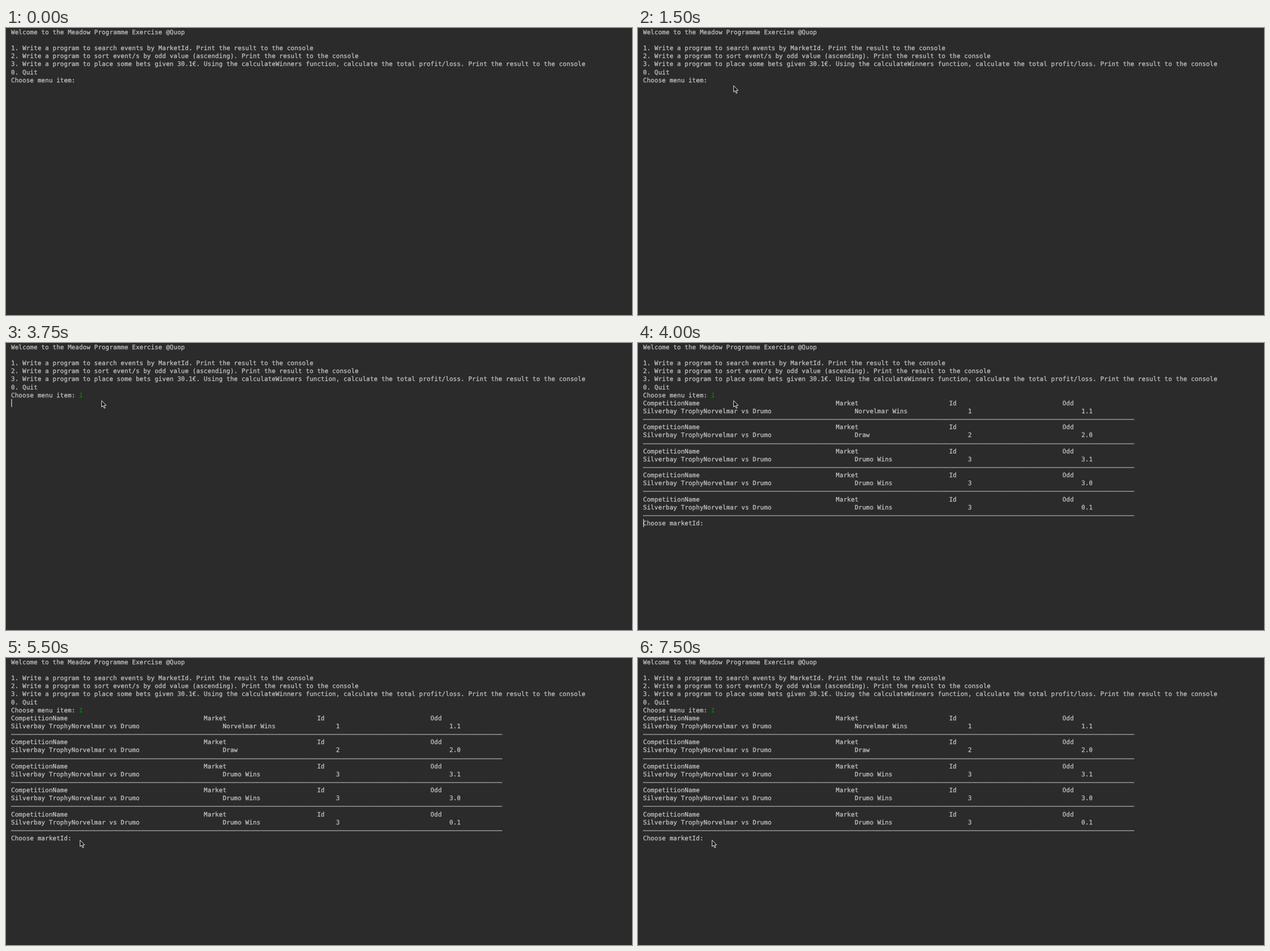
Animation of 1104x507 px, one loop 8 s. Source, as an HTML page with a canvas:

```html
<!DOCTYPE html>
<html lang="en">
<head>
<meta charset="utf-8">
<title>Console menu</title>
<style>
  html, body { margin: 0; width: 100%; height: 100%; overflow: hidden; background: #2b2b2b; }
  pre {
    position: absolute; left: 9px; top: 0.85px; margin: 0;
    font: 10.83px/14.14px "DejaVu Sans Mono", "Liberation Mono", monospace;
    letter-spacing: 0.144px;
    font-variant-ligatures: none;
    text-rendering: geometricPrecision;
    color: #c0c0c0;
    -webkit-text-stroke: 0.3px;
  }
  pre i { color: #008a00; }
  canvas { position: absolute; left: 0; top: 0; }
</style>
</head>
<body>
<pre><span id="menu"></span><i id="typed"></i><span id="table"></span></pre>
<canvas id="stage" width="1104" height="507"></canvas>
<script>
const LOOP = 8000, TICK = 250, BLINK = 500;
const LEFT = 9, CHAR = 6.664, LINE = 14.14;
const FOCUS = 1000, TYPED = 2250, ENTER = 3750, OUTPUT = 4000, CLICK = 5500;

const el = id => document.getElementById(id);
const ctx = el('stage').getContext('2d');

const menu = [
  'Welcome to the Meadow Programme Exercise @Quop',
  '',
  '1. Write a program to search events by MarketId. Print the result to the console',
  '2. Write a program to sort event/s by odd value (ascending). Print the result to the console',
  '3. Write a program to place some bets given 30.1€. Using the calculateWinners function, ' +
    'calculate the total profit/loss. Print the result to the console',
  '0. Quit',
  'Choose menu item: '
].join('\n');

// Columns after the first are 30 characters apart
const columns = (cells, indent) =>
  cells.reduce((line, cell, i) => line.padEnd(21 + 30 * i + indent) + cell);

const outcomes = ['Norvelmar Wins', 'Draw', 'Drumo Wins'];
const marketRows = ['1.1', '2.0', '3.1', '3.0', '0.1'].map((odd, i) => {
  const id = Math.min(i, 2);
  return [
    columns(['CompetitionName', 'Market', 'Id', 'Odd'], 0),
    columns(['Silverbay TrophyNorvelmar vs Drumo', outcomes[id], id + 1, odd], 5),
    '—'.repeat(130)
  ].join('\n');
});
const table = ['', ...marketRows, 'Choose marketId:'].join('\n');

// Cubic Bezier mouse sweeps
const sweeps = [
  { start: 250, length: 500, path: [[246, 55], [155, 107], [155, 107], [167, 101]] },
  { start: 4500, length: 1000, path: [[167, 101], [17, 420], [153, 294], [129, 321]] }
];

const mix = (a, b, u) => a.map((v, i) => v + (b[i] - v) * u);

function along(path, u) {
  while (path.length > 1) path = path.slice(1).map((p, i) => mix(path[i], p, u));
  return path[0].map(Math.round);
}

function pointerAt(t) {
  const step = Math.floor(t / TICK) * TICK;
  const sweep = sweeps.filter(s => s.start <= step).pop();
  return sweep && along(sweep.path, Math.min(1, (step - sweep.start) / sweep.length));
}

function caretAt(t) {
  // A key press restarts the blink at the next half second
  const restart = [FOCUS, TYPED, ENTER].filter(k => k <= t).pop();
  if (!restart) return null;
  const phase = t - Math.ceil(restart / BLINK) * BLINK;
  if (phase >= 0 && Math.floor(phase / BLINK) % 2) return null;
  if (t < ENTER) return [t < TYPED ? 18 : 19, 6];
  if (t < OUTPUT) return [0, 7];
  return [t < CLICK ? 0 : 16, 22];
}

const arrow = new Path2D('M1.7 .8V12L4.2 9.7 6.1 14.3 8 13.5 6.1 9.2H9.6Z');

function drawPointer(x, y) {
  ctx.save();
  ctx.translate(x, y);
  ctx.fillStyle = '#111';
  ctx.strokeStyle = '#eee';
  ctx.fill(arrow);
  ctx.stroke(arrow);
  ctx.restore();
}

function drawCaret(col, line) {
  ctx.fillStyle = '#ccc';
  ctx.fillRect(LEFT + 0.2 + col * CHAR, line * LINE, 1.33, LINE);
}

function setText(id, text) {
  const node = el(id);
  if (node.textContent !== text) node.textContent = text;
}

function render(t) {
  setText('typed', t >= TYPED ? '1' : '');
  setText('table', t >= OUTPUT ? table : '');
  ctx.clearRect(0, 0, 1104, 507);
  const caret = caretAt(t), pointer = pointerAt(t);
  if (caret) drawCaret(...caret);
  if (pointer) drawPointer(...pointer);
}

setText('menu', menu);
const start = performance.now();
function tick() {
  render((performance.now() - start) % LOOP);
  requestAnimationFrame(tick);
}
tick();
</script>
</body>
</html>
```
